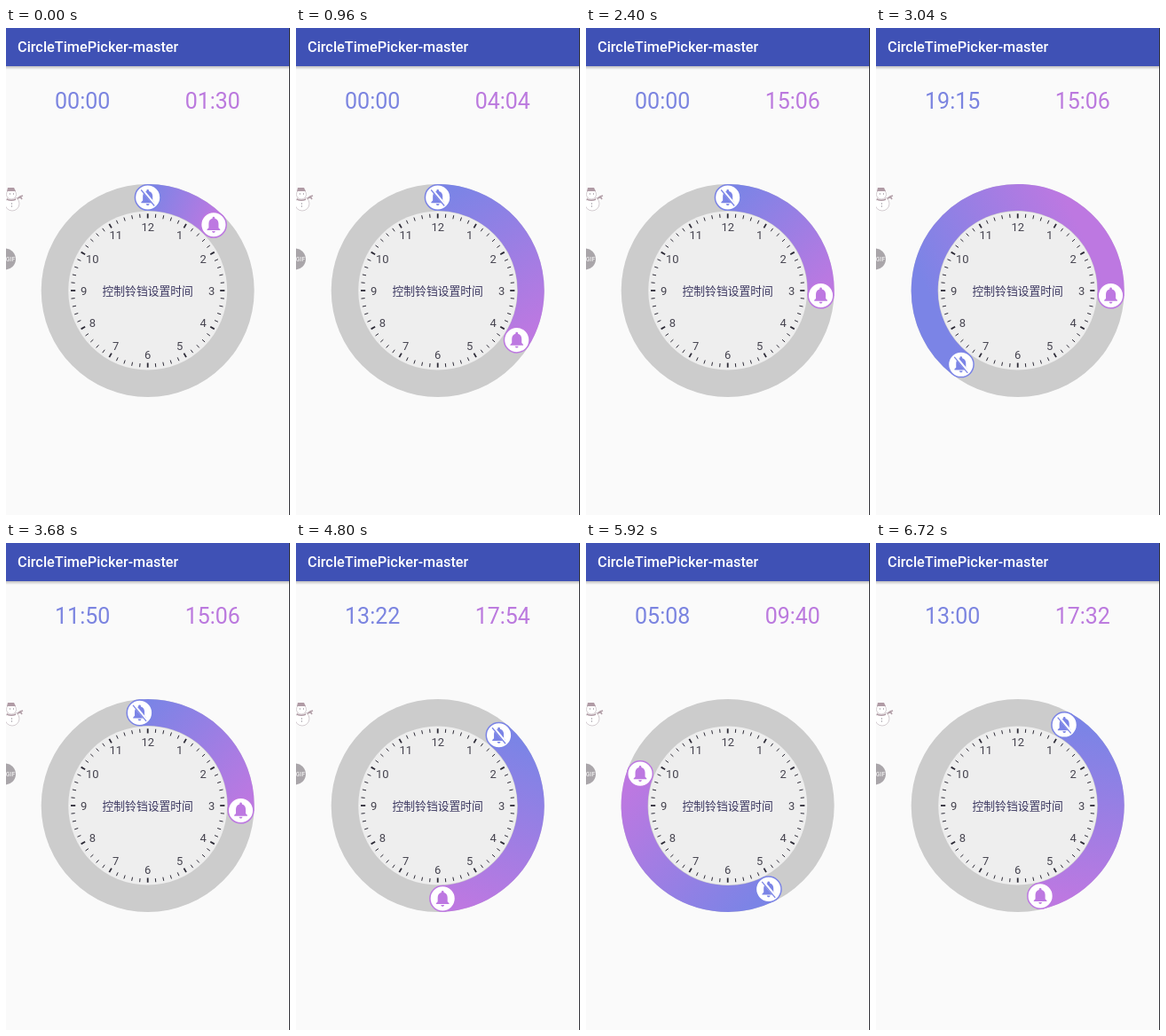
An HTML page that plays this animation: 320x549 px, repeating every 7.2 s.

```html
<!DOCTYPE html>
<html lang="zh">
<head>
<meta charset="utf-8">
<title>Circle time picker</title>
<style>
  html, body { margin: 0; width: 100%; height: 100%; overflow: hidden; background: #fafafa; }
  svg { display: block; width: 100vw; height: 100vh; }
  text { font-family: Roboto, sans-serif; text-anchor: middle; }
  .title { font-size: 16.3px; font-weight: 500; fill: #fff; text-anchor: start; }
  .time { font-size: 25px; }
  .hour { font-size: 13px; fill: #45434f; }
  .label { font: 12.8px "Noto Sans CJK SC", "Noto Sans CJK", sans-serif; fill: #3b3760; }
  .tick { stroke: #2c2a36; }
</style>
</head>
<body>
<svg viewBox="0 0 320 549" preserveAspectRatio="none">
  <defs>
    <linearGradient id="shade" x2="0" y2="1">
      <stop stop-color="#000" stop-opacity=".24"/>
      <stop offset="1" stop-color="#000" stop-opacity="0"/>
    </linearGradient>
    <linearGradient id="sweep" gradientUnits="userSpaceOnUse">
      <stop stop-color="#7b84e6"/>
      <stop offset="1" stop-color="#bd78e1"/>
    </linearGradient>
    <path id="bell" transform="scale(.92) translate(-12 -12.25)" d="M12 22c1.1 0 2-.9 2-2h-4c0 1.1.9 2 2 2zm6-6v-5c0-3.07-1.64-5.64-4.5-6.32V4a1.5 1.5 0 0 0-3 0v.68C7.63 5.36 6 7.92 6 11v5l-2 2v1h16v-1z"/>
  </defs>

  <rect width="320" height="549" fill="#fafafa"/>
  <rect y="43" width="320" height="4" fill="url(#shade)"/>
  <rect width="320" height="43" fill="#3f51b5"/>
  <text class="title" x="13" y="26.8">CircleTimePicker-master</text>
  <text class="time" id="startText" x="86.2" y="90.6" fill="#7b84e0"></text>
  <text class="time" id="endText" x="232.8" y="90.6" fill="#bb79de"></text>

  <g stroke="#c9c0c6" stroke-width=".8" fill="#fff">
    <path d="M12 193l4-3 3-1m-3 1l2 3" fill="none" stroke="#b3a0a9" stroke-width="1.6"/>
    <circle cx="7" cy="198" r="8"/>
    <circle cx="6" cy="187.500" r="5.500"/>
    <path d="M1 184l1-4h7l2 4zM1 192q5 3 10 0v2q-5 2-10 0z" fill="#b09ba5" stroke="none"/>
    <path d="M4 187h1m3 0h1M6 198h1m-1 3h1" stroke="#77707a" stroke-width="1.200"/>
  </g>
  <circle cx="-1" cy="260.500" r="12" fill="#aaa6aa"/>
  <text x="5" y="263" font-size="7" fill="#fff">GIF</text>

  <g transform="translate(159.700 296)">
    <circle r="120" fill="#ccc"/>
    <path id="arc" fill="none" stroke="url(#sweep)" stroke-width="30"/>
    <circle r="89.500" fill="#eee"/>
    <g id="face"></g>
    <text class="label" y="4.800">控制铃铛设置时间</text>
    <g id="startKnob" fill="#7b84e6" stroke="#7b84e6">
      <circle r="14.300" fill="#fff" stroke-width="1.500"/>
      <use href="#bell" stroke="none"/>
      <path d="M-6.500 -9L8 8.500" stroke="#fff" stroke-width="3.200"/>
      <path d="M-7.500 -8.500L7.500 9.500" stroke-width="1.300"/>
    </g>
    <g id="endKnob" fill="#bd78e1" stroke="#bd78e1">
      <circle r="14.300" fill="#fff" stroke-width="1.500"/>
      <use href="#bell" stroke="none"/>
    </g>
  </g>
  <rect x="319" width="1" height="549" fill="#34343a"/>
</svg>
<script>
const LOOP = 7200, STEP = 160, HALF_DAY = 720, DAY = 1440, RADIUS = 105;
const $ = id => document.getElementById(id);
const mod = (a, n) => ((a % n) + n) % n;

// Minutes moved at each step of a drag
const drags = [
  { at: 480, end: 1, steps: [15, 34, 48, 57, 66, 74, 80, 84, 86, 84, 78, 66, 44] },
  { at: 2720, start: 1, steps: [-60, -100, -125, -130, -125, -110, -80, -52, -24] },
  { at: 4480, start: 1, end: 1,
    steps: [25, 53, 90, 115, 133, 140, 143, 140, 138, 137, 140, 130, 110, 70, 22] }
];

function polar(minutes, r) {
  const a = minutes / HALF_DAY * 2 * Math.PI;
  return [r * Math.sin(a), -r * Math.cos(a)];
}

function clock(minutes) {
  const m = mod(minutes, DAY), pad = n => String(n).padStart(2, '0');
  return pad(Math.floor(m / 60)) + ':' + pad(m % 60);
}

function drawFace() {
  let out = '';
  for (let i = 0; i < 60; i++) {
    const major = i % 5 === 0;
    const [x1, y1] = polar(i * 12, major ? 81.5 : 82.5);
    const [x2, y2] = polar(i * 12, 86.7);
    out += `<line class="tick" x1="${x1}" y1="${y1}" x2="${x2}" y2="${y2}" stroke-width="${major ? 1.8 : 1}"/>`;
  }
  for (let h = 1; h <= 12; h++) {
    const [x, y] = polar(h * 60, 72);
    out += `<text class="hour" x="${x}" y="${y + 4.6}">${h}</text>`;
  }
  $('face').innerHTML = out;
}

function timesAt(t) {
  let start = 0, end = 90;
  for (const drag of drags) {
    const count = Math.max(0, Math.floor((t - drag.at) / STEP) + 1);
    const moved = drag.steps.slice(0, count).reduce((a, b) => a + b, 0);
    if (drag.start) start += moved;
    if (drag.end) end += moved;
  }
  return { start, end };
}

function render() {
  const { start, end } = timesAt(performance.now() % LOOP);
  const [x1, y1] = polar(start, RADIUS), [x2, y2] = polar(end, RADIUS);
  const large = mod(end - start, HALF_DAY) > HALF_DAY / 2 ? 1 : 0;
  $('arc').setAttribute('d', `M${x1} ${y1}A${RADIUS} ${RADIUS} 0 ${large} 1 ${x2} ${y2}`);
  Object.entries({ x1, y1, x2, y2 }).forEach(([k, v]) => $('sweep').setAttribute(k, v));
  $('startKnob').setAttribute('transform', `translate(${x1} ${y1})`);
  $('endKnob').setAttribute('transform', `translate(${x2} ${y2})`);
  $('startText').textContent = clock(start);
  $('endText').textContent = clock(end);
  requestAnimationFrame(render);
}

drawFace();
render();
</script>
</body>
</html>
```
